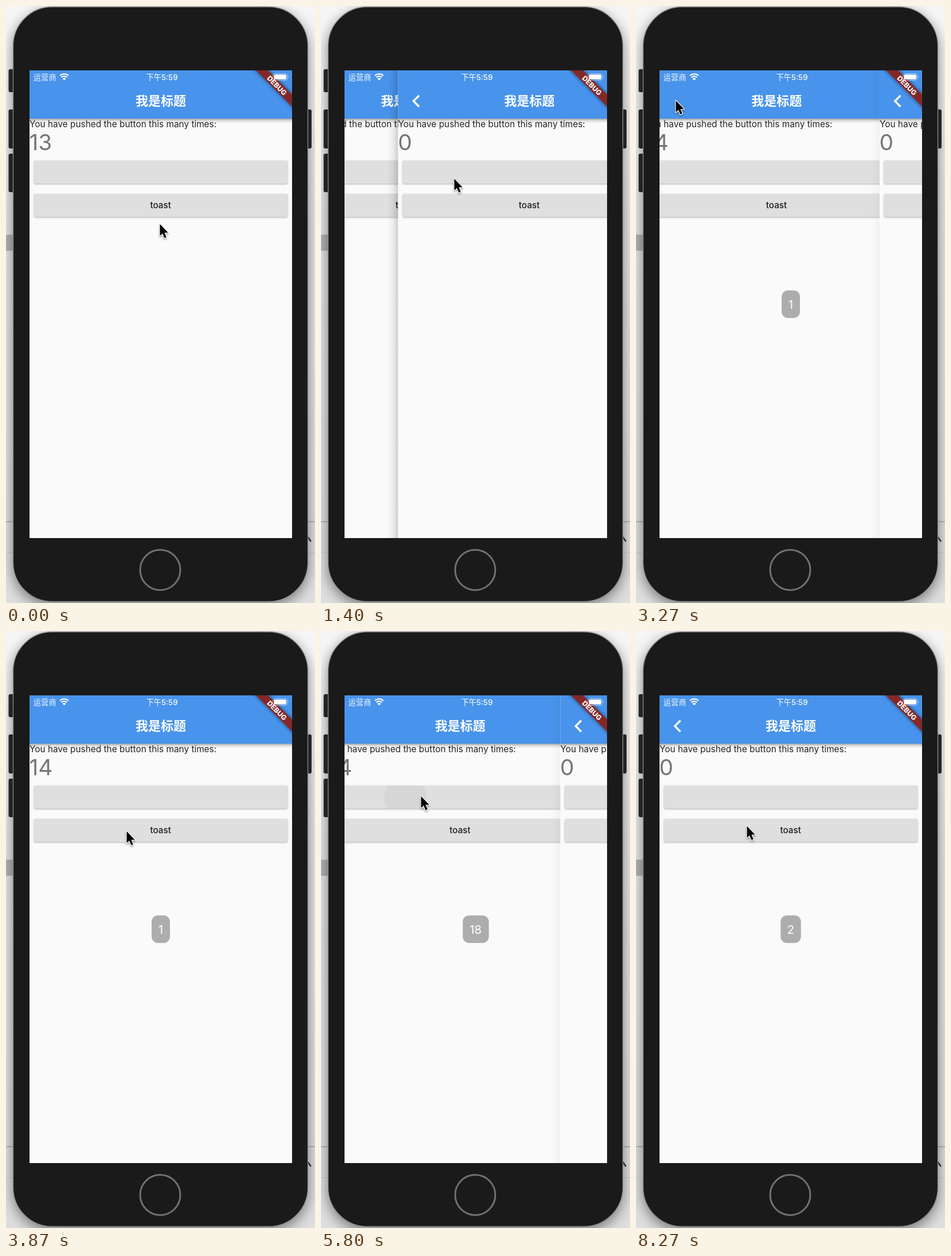
These frames come from a looping animation (539x1039 px, 8740 ms). An HTML page:

```html
<!DOCTYPE html>
<html lang="zh-CN">
<head>
<meta charset="utf-8">
<title>Counter demo</title>
<style>
html, body { margin: 0; width: 100%; height: 100%; overflow: hidden; background: #ddd; }
svg { display: block; width: 100%; height: 100%; }
text { font-family: Inter, "Noto Sans CJK SC", "Noto Sans CJK", sans-serif; }
.mid { text-anchor: middle; }
.btn { fill: #dfdfdf; filter: drop-shadow(0 1.5px 1.5px rgba(0,0,0,.32)); }
.ripple { fill: rgb(200,200,200); }
.cursor { filter: drop-shadow(0 2px 1.5px rgba(0,0,0,.35)); }
.body { filter: drop-shadow(0 7px 11px rgba(0,0,0,.45)); }
.ribbon { filter: drop-shadow(0 0 3px rgba(0,0,0,.6)); }
</style>
</head>
<body>
<svg viewBox="0 0 539 1039" preserveAspectRatio="none">
  <defs>
    <linearGradient id="desk" x2="0" y2="1">
      <stop offset="0" stop-color="#f6f6f6"/><stop offset=".35" stop-color="#e6e6e6"/><stop offset="1" stop-color="#dedede"/>
    </linearGradient>
    <linearGradient id="barShade" x2="0" y2="1">
      <stop offset="0" stop-opacity=".36"/><stop offset=".4" stop-opacity=".13"/><stop offset="1" stop-opacity="0"/>
    </linearGradient>
    <linearGradient id="edgeShade">
      <stop offset="0" stop-opacity="0"/><stop offset=".3" stop-opacity=".016"/>
      <stop offset=".6" stop-opacity=".07"/><stop offset="1" stop-opacity=".22"/>
    </linearGradient>
    <clipPath id="screen"><rect x="41" y="112" width="458" height="814"/></clipPath>
    <clipPath id="btn0"><rect x="49" y="269" width="442" height="40" rx="2.5"/></clipPath>
    <clipPath id="btn1"><rect x="49" y="327" width="442" height="40" rx="2.5"/></clipPath>
  </defs>

  <!-- desktop behind the phone -->
  <rect width="539" height="1039" fill="url(#desk)"/>
  <path d="M444.5 0V3" stroke="#999"/>
  <rect y="398" width="14" height="28" fill="#b4b4b4"/>
  <path d="M0 897.5H539" stroke="#a8a8a8" stroke-width="1.5"/>
  <path d="M0 951.5H539" stroke="#ccc"/>
  <path d="M523 934l4-9 5 7" fill="none" stroke="#333" stroke-width="2.5"/>

  <!-- phone -->
  <g fill="#2b2b2b">
    <rect x="4.5" y="110" width="12" height="40" rx="3"/>
    <rect x="4.5" y="180" width="12" height="68" rx="3"/>
    <rect x="4.5" y="257" width="12" height="67" rx="3"/>
    <rect x="521" y="180" width="12" height="68" rx="3"/>
  </g>
  <rect class="body" x="12.5" y="1.5" width="514" height="1035" rx="68" fill="#1a1a1a" stroke="#8c8c8c" stroke-width="1.3"/>
  <circle cx="269" cy="981.5" r="35" fill="none" stroke="#717171" stroke-width="3"/>

  <g clip-path="url(#screen)">
    <g id="home"></g>
    <rect id="edge" y="112" width="23" height="814" fill="url(#edgeShade)"/>
    <g id="next"></g>
    <g transform="translate(499 112) rotate(45)">
      <rect class="ribbon" x="-55" y="29.8" width="110" height="14.6" fill="#852727"/>
      <text class="mid" y="41.8" font-size="12.2" font-weight="800" fill="#fff">DEBUG</text>
    </g>
    <g fill="#fff" font-size="13.3">
      <text x="47.8" y="128.5" fill-opacity=".92">运营商</text>
      <text class="mid" x="272" y="128.5" font-weight="500">下午5:59</text>
      <path d="M101.5 129.5l-3-3a4.3 4.3 0 0 1 6 0z"/>
      <path d="M96.6 124.3a7 7 0 0 1 9.8 0M94.1 121.3a10.6 10.6 0 0 1 14.8 0" fill="none" stroke="#fff" stroke-width="2.1"/>
      <rect x="465.5" y="117.5" width="25" height="12" rx="3.5" fill="none" stroke="#fff" stroke-opacity=".5"/>
      <rect x="467.3" y="119.2" width="21.5" height="8.6" rx="2"/>
      <path d="M492 121.5q2 2 0 4z" fill-opacity=".6"/>
    </g>
    <g id="toast">
      <rect id="toastBox" y="495" height="48" rx="11" fill="#adadad"/>
      <text id="toastText" class="mid" x="269.8" y="526.5" font-size="20.5" fill="#fff"></text>
    </g>
  </g>

  <circle id="ring" r="33.5" fill="none" stroke="#000" stroke-width="2.5"/>
  <path id="cursor" class="cursor" d="M.5 1.5V22L5 17.800 8.400 25.800 11.800 24.300 8.400 16.500H14.800Z"
    stroke="#fff" stroke-width="2.4" paint-order="stroke" stroke-linejoin="round"/>
</svg>

<script>
const LOOP = 8740, PUSH_MS = 350, WIDTH = 458;
const $ = id => document.getElementById(id);
const clamp = v => Math.max(0, Math.min(1, v));

// Cursor stops: time, x, y
const stops = [
  [0, 268, 378], [70, 268, 378], [670, 240, 308], [870, 240, 308], [1070, 232, 299],
  [1600, 232, 299], [2000, 218, 336], [2540, 218, 336], [2600, 217, 321], [2880, 69, 163],
  [3300, 69, 163], [3670, 210, 346], [3870, 210, 347], [4520, 210, 347], [4800, 198, 313],
  [5330, 174, 286], [6080, 174, 286], [6330, 193, 338], [LOOP, 193, 338]
];
// Mouse down and up times
const clicks = [
  [1070, 1170], [2060, 2150], [2930, 3010], [3930, 4000], [4100, 4170],
  [4270, 4340], [4440, 4510], [5670, 5740], [6640, 6870], [7530, 7730]
];
// Toasts: start, label, box width
const toasts = [
  [2170, '1', 32], [4020, '15', 45.5], [4190, '16', 45.5], [4360, '17', 45],
  [4530, '18', 45.5], [6890, '1', 32], [7760, '2', 35.5]
];

const button = y => `<rect class="btn" x="49" y="${y}" width="442" height="40" rx="2.5"/>`;
const page = isNext => `
  <rect x="41" y="112" width="${WIDTH}" height="814" fill="#fafafa"/>
  <rect x="41" y="196" width="${WIDTH}" height="8" fill="url(#barShade)"/>
  <rect x="41" y="112" width="${WIDTH}" height="84" fill="#4893eb"/>
  ${isNext ? '<path d="M77.5 155.8L67.8 165.5 77.5 175.2" fill="none" stroke="#fff" stroke-width="3.4"/>' : ''}
  <text class="mid" x="270" y="173.3" font-size="22" font-weight="700" fill="#fff">我是标题</text>
  <text x="41" y="210.6" font-size="15.4" fill="#222">You have pushed the button this many times:</text>
  <text class="count" x="40.6" y="251" font-size="38.8" fill="#757575">0</text>
  ${button(269)}${button(327)}
  <g class="clip"><circle class="ripple"/></g>
  <text class="mid" x="269.7" y="352" font-size="15.2" font-weight="500" fill="#1c1c1c">toast</text>`;

const home = $('home'), next = $('next');
home.innerHTML = page(false);
next.innerHTML = page(true);
const count = home.querySelector('.count');

// cubic-bezier(0, 0, .58, 1)
function easeOut(x) {
  let lo = 0, hi = 1;
  for (let i = 0; i < 24; i++) {
    const u = (lo + hi) / 2;
    if (1.74 * u * u * (1 - u) + u * u * u < x) lo = u; else hi = u;
  }
  return lo * lo * (3 - 2 * lo);
}

function cursorAt(t) {
  const i = stops.findIndex(s => s[0] > t);
  const [t0, x0, y0] = stops[i - 1], [t1, x1, y1] = stops[i];
  const u = (t - t0) / (t1 - t0), k = u * u * (3 - 2 * u);
  return [x0 + (x1 - x0) * k, y0 + (y1 - y0) * k];
}

function slideAt(t) {
  const run = start => easeOut(clamp((t - start) / PUSH_MS));
  return run(1187) - run(3040) + run(5762);
}

function drawPages(t) {
  const p = slideAt(t), x = WIDTH * (1 - p);
  home.setAttribute('transform', `translate(${-WIDTH / 3 * p} 0)`);
  next.setAttribute('transform', `translate(${x} 0)`);
  next.style.display = p > 0.001 ? '' : 'none';
  $('edge').setAttribute('x', 41 + x - 23);
  $('edge').setAttribute('opacity', p);
  count.textContent = t < 1560 ? '13' : '14';
}

function drawRipple(t) {
  const click = clicks.findLast(c => c[1] <= t);
  const up = click ? click[1] : -LOOP;
  const [x, y] = cursorAt(Math.max(0, up)), age = t - up;
  const onNext = (up > 1560 && up < 3040) || up > 6110;
  for (const group of [home, next]) {
    const dot = group.querySelector('.ripple');
    const shown = y > 250 && age < 220 && onNext === (group === next);
    dot.setAttribute('r', shown ? age * 0.6 : 0);
    dot.setAttribute('cx', x);
    dot.setAttribute('cy', y + 2);
    dot.setAttribute('opacity', 0.4 * clamp((220 - age) / 140));
    group.querySelector('.clip').setAttribute('clip-path', `url(#btn${y < 318 ? 0 : 1})`);
  }
}

function drawToast(t) {
  const toast = toasts.findLast(s => s[0] <= t);
  let alpha = 0;
  if (toast) {
    const [start, label, width] = toast;
    alpha = clamp((t - start) / 150);
    if (label === '18') alpha *= clamp((6735 - t) / 205);
    $('toastText').textContent = label;
    $('toastBox').setAttribute('x', 270 - width / 2);
    $('toastBox').setAttribute('width', width);
  }
  $('toast').setAttribute('opacity', alpha);
}

function drawPointer(t) {
  const [x, y] = cursorAt(t);
  const pressed = clicks.some(([down, up]) => t >= down && t < up);
  $('cursor').setAttribute('transform', `translate(${x} ${y})`);
  $('ring').setAttribute('transform', `translate(${x - 0.5} ${y + 2})`);
  $('ring').style.display = pressed ? '' : 'none';
}

const begin = performance.now();
function frame() {
  const t = (performance.now() - begin) % LOOP;
  drawPages(t);
  drawRipple(t);
  drawToast(t);
  drawPointer(t);
  requestAnimationFrame(frame);
}
frame();
</script>
</body>
</html>
```
